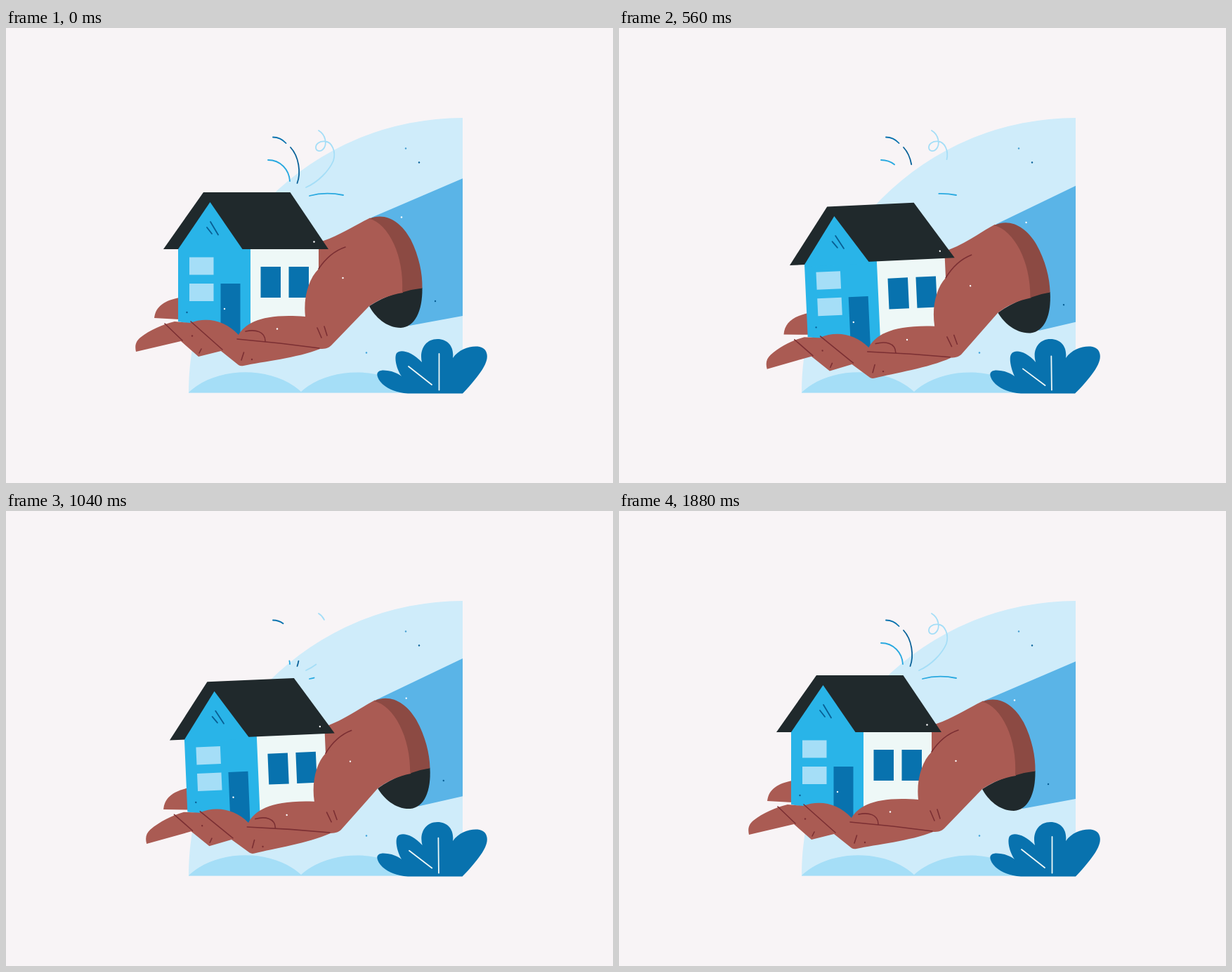
Write an HTML page that moves like this. It is 864 by 648 pixels and loops after 1920 ms.

```html
<!DOCTYPE html>
<html lang="en">
<head>
<meta charset="utf-8">
<title>House in hand</title>
<style>
  html, body { margin: 0; width: 100%; height: 100%; overflow: hidden; background: #f8f4f6; }
  svg { display: block; width: 100vw; height: 100vh; }
  .line { fill: none; stroke-linecap: round; stroke-width: 1.8; }
  .crease { stroke: #7b2f33; stroke-width: 1.6; }
  .navy { fill: #0872ae; }
  .pale { fill: #a5def7; }
  .skin { fill: #aa5b53; }
  .ink { fill: #20292c; }
</style>
</head>
<body>
<svg viewBox="0 0 864 648">
  <clipPath id="edge"><rect width="650" height="648"/></clipPath>

  <path fill="#cfecfa" d="M650 519.5H260A390 391 0 0 1 650 128Z"/>
  <path class="pale" d="M260 519C300 481 380 481 420 518C460 481 540 481 580 519.5H260Z"/>
  <g id="sparks"></g>

  <g clip-path="url(#edge)">
    <g id="held">
      <path fill="#5ab4e7" d="M520 270L720 184.4V397L574 424Z"/>
      <path class="skin" d="M211 413C213 396 226 388 247 384V415Z"/>

      <path fill="#eef8f7" d="M347 314H445V420H347Z"/>
      <path fill="#29b4e8" d="M245 314H348V430L331 438L262 421L245 418Z"/>
      <path class="pale" d="M261 326.5h34.5v25H261ZM261 364h34.5v25H261Z"/>
      <path class="navy" d="M305.5 364h28V438l-4 -1L305.5 428ZM362.5 340h28.5v44h-28.5ZM402.5 340h28.5v44h-28.5Z"/>

      <path class="ink" d="M592.5 370C565 373 540 381 517 396C525 411 541 427 562 427C582 426 593 403 592.5 370Z"/>
      <path class="skin" d="M185 461C183 452 185 446 191 441C205 430 223 422 240 418L262 420C285 411 312 416 331 437
        C341 420 365 406 426 411C423 383 431 357 445 343V305L452 303C478 294 500 279 518 270.500C548 276 574 320 565 377
        C546 380 530 387 517 396L463 452C459 456 455 457 447 457C415 470 365 475 338 481Q334 482 331 480L306 460L274 468L249 446Z"/>
      <path fill="#8c4a43" d="M517 271.500C540 262 562 275 576 301C588 325 593 350 592.5 370.500Q578 372 564 376.500C567 325 545 279 517 271.500Z"/>
      <path class="line crease" d="M226 421L251 445M263 418L308 458M329 443L390 449L446 456M341 432C355 429 369 432 369 446
        M443 427L449 441M453 425L457 438M338.500 462L335 473M278 457L275 463M445 343C455 328 468 317 483 312"/>

      <path class="ink" d="M281 234H404.500L459 315H224Z"/>
      <path fill="#29b4e8" d="M245 318V315L290.500 248L336.500 315V318Z"/>
      <path class="line" stroke="#085f94" d="M291 276L302 294.500M286 284L293 293"/>
      <g id="specks"></g>
    </g>
  </g>

  <path id="bush" class="navy"/>
  <path id="veins" class="line" stroke="#eef8f7"/>
  <g id="still"></g>
</svg>

<script>
const $ = id => document.getElementById(id);
const LOOP = 1920, STEP = 40;

function add(parent, tag, attrs) {
  const node = document.createElementNS('http://www.w3.org/2000/svg', tag);
  for (const key in attrs) node.setAttribute(key, attrs[key]);
  return parent.appendChild(node);
}

const dot = (group, fill, cx, cy) => add($(group), 'circle', { cx, cy, fill, r: 1.2 });
dot('still', '#4a9fd0', 569, 171.5);
dot('still', '#0a6299', 588, 191.5);
dot('still', '#3fa3dc', 513, 462.5);
for (const [x, y] of [[563, 269.5], [438.5, 304.5], [479.5, 356], [386, 428.5], [311, 400]]) dot('specks', '#fff', x, y);
for (const [x, y] of [[257.5, 405], [611, 389]]) dot('specks', '#085f94', x, y);
for (const [x, y] of [[265, 438.5], [350, 472]]) dot('specks', '#7b2f33', x, y);

// Every spark runs from the house outwards; out and back are its erase and regrow times.
const sparks = [
  { d: 'M414.500 221C420 206 417 183 405 170', color: '#0a6299', out: [120, 1000], back: [933, 1695] },
  { d: 'M398.500 164C393 158 387 155.500 380 155.500', color: '#0872ae', out: [960, 1270], back: [1700, 1850] },
  { d: 'M404 218C403 202 391 188 373 188', color: '#29a9e0', out: [0, 985], back: [955, 1850] },
  { d: 'M427 227C445 219 460 203 466 189C470 176 464 162 454 161.500C446 161 441 165 441 170C441 175 447 177 451 173C458 166 455 152 445 146',
    color: '#a5def7', out: [225, 1110], back: [952, 1752] },
  { d: 'M432 239C447 235 465 235 480 238', color: '#29a9e0', out: [214, 923], back: [933, 1695] }
];
for (const s of sparks) {
  const make = () => add($('sparks'), 'path', { d: s.d, stroke: s.color, class: 'line', pathLength: 1 });
  s.tip = make();
  s.root = make();
}

const ramp = (t, [from, to]) => Math.min(1, Math.max(0, (t - from) / (to - from)));

function showSpan(path, from, to) {
  path.style.display = to - from > 0.005 ? '' : 'none';
  path.setAttribute('stroke-dasharray', `${to - from} 2`);
  path.setAttribute('stroke-dashoffset', -from);
}

const times = [0, 320, 560, 640, 880, 1200, 1520, 1880];
const shiftX = [0, 9, 19, 19.7, 15.5, 3, 1, 0];
const shiftY = [0, 11, 23, 24, 19, 4.5, 0.2, 0];
const tilt = [0, 1.38, 2.62, 2.75, 2.7, 2.05, 0.95, 0];

// Smooth cubic through the keys, at rest at both ends.
function follow(values, t) {
  const last = times.length - 1;
  if (t >= times[last]) return values[last];
  const i = times.findIndex(k => k > t) - 1;
  const slope = k => k < 1 || k >= last ? 0
    : (values[k + 1] - values[k - 1]) / (times[k + 1] - times[k - 1]);
  const span = times[i + 1] - times[i], u = (t - times[i]) / span, v = 1 - u;
  return values[i] * v * v * (1 + 2 * u) + values[i + 1] * u * u * (3 - 2 * u)
    + span * u * v * (slope(i) * v - slope(i + 1) * u);
}

function render(t) {
  const x = follow(shiftX, t), y = follow(shiftY, t), angle = follow(tilt, t);
  $('held').setAttribute('transform', `translate(${x} ${y}) rotate(${-angle} 224 315)`);

  const sway = y / 24, lean = angle * 0.45, leaf = 2.5 * sway;
  $('bush').setAttribute('d', `M572 520.5C548 519 533 508 529 497C526 489 533 486 543 488C551 489 558 492 563 496
    C${556 + leaf} 486 ${552 + leaf} 470 ${556 + leaf} ${463 + leaf / 2}C${561 + leaf} 457 ${577 + leaf} 460 ${592 + leaf / 2} 476
    C588 460 596 443 614 443C630 443 638 455 636 470C645 457 662 452 674 454C684 456 688 466 682 479
    C676 492 660 510 ${650 - sway} 520.5Z`);
  $('veins').setAttribute('d', `M${573 + 2 * sway} ${482 + 3.5 * sway}L${606 + sway / 2} ${508 + sway}
    M${616.5 - lean} ${464 + 3.5 * sway}L${616.5 - lean / 2} 515.5`);

  for (const s of sparks) {
    showSpan(s.tip, ramp(t, s.out), 1);
    showSpan(s.root, 0, ramp(t, s.back));
  }
}

const start = performance.now();
function tick() {
  const t = (performance.now() - start) % LOOP;
  render(Math.floor(t / STEP) * STEP);
  requestAnimationFrame(tick);
}
render(0);
requestAnimationFrame(tick);
</script>
</body>
</html>
```
